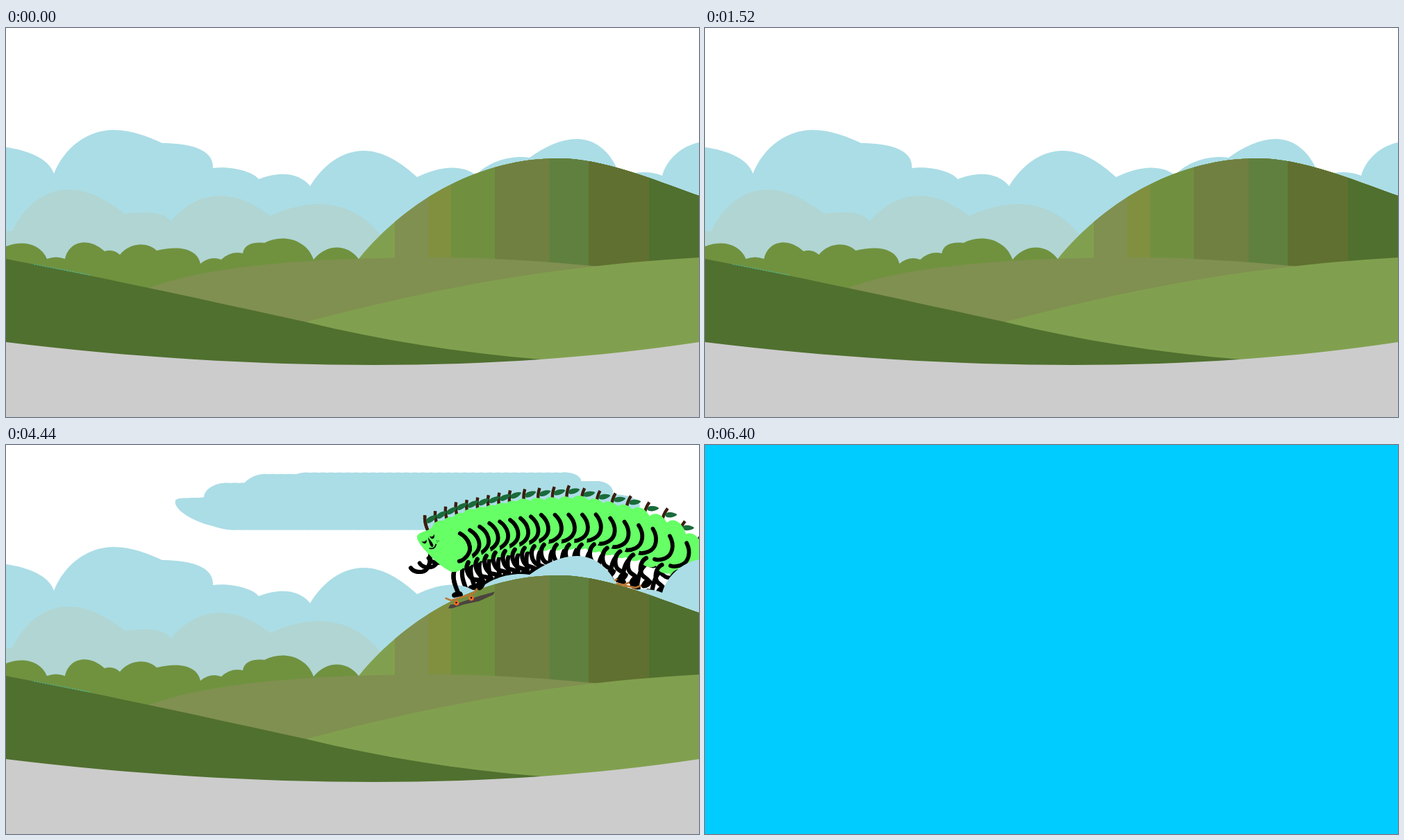
An HTML page with a canvas for the animation above (6.44 s loop, 998 by 561 pixels).

```html
<!DOCTYPE html>
<html lang="en">
<head>
<meta charset="utf-8">
<title>Skating pear</title>
<style>
html, body { margin: 0; width: 100%; height: 100%; overflow: hidden; background: #fff; }
canvas { display: block; width: 998px; height: 561px; }
</style>
</head>
<body>
<canvas id="stage" width="998" height="561"></canvas>
<script>
const ctx = document.getElementById('stage').getContext('2d');
const LOOP = 6440, STEP = 40;
const shape = (d, fill) => ({ path: new Path2D(d), fill });
const line = (d, stroke, width, cap = 'round') => ({ path: new Path2D(d), stroke, width, cap });

function paint(parts) {
  for (const p of parts) {
    if (p.fill) {
      ctx.fillStyle = p.fill;
      ctx.fill(p.path);
    } else {
      ctx.strokeStyle = p.stroke;
      ctx.lineWidth = p.width;
      ctx.lineCap = p.cap;
      ctx.lineJoin = 'round';
      ctx.stroke(p.path);
    }
  }
}

const SKY = '#abdde6';
const farScenery = [
  shape('M0 172 C30 176 62 188 69 210 C84 172 118 147 155 147 C182 147 205 157 225 166 C262 166 300 174 298 202 C325 199 355 207 364 218 C396 206 422 209 438 228 C456 198 484 177 515 177 C544 177 570 195 592 215 C625 199 655 196 677 212 C696 192 728 183 754 187 C776 171 800 160 822 160 C850 160 870 180 880 203 L905 209 Q928 206 945 213 C952 188 974 170 998 165 V561 H0Z', SKY),
  shape('M0 293 H9 C26 258 54 233 90 233 C122 233 150 252 172 268 C198 264 228 264 237 279 C256 257 280 242 308 242 C338 242 360 256 381 271 C404 260 428 254 452 254 C492 254 522 275 540 300 V400 H0Z', '#b0d5d3'),
  shape('M0 315 C26 305 50 312 59 333 Q72 328 85 333 C90 308 118 300 142 322 Q154 318 164 327 C178 309 204 308 217 321 C248 313 276 318 280 340 Q294 328 310 334 Q324 321 341 325 C343 312 356 308 372 310 C396 297 432 303 443 334 C460 312 490 310 507 332 L540 400 H0Z', '#70923f')
];

const hill = new Path2D('M508 333 C580 245 685 188 795 188 C860 188 930 218 998 242 V400 H508Z');
const stripes = [
  [508, '#81a04f'], [560, '#809050'], [608, '#81903f'], [641, '#709040'],
  [704, '#708040'], [783, '#608040'], [839, '#607030'], [926, '#50702f']
];

const nearScenery = [
  shape('M203 376 C300 338 480 331 620 331 C700 331 780 337 855 344 V470 H203Z', '#809050'),
  shape('M432 424 C570 388 750 345 998 331 V500 H432Z', '#81a04f'),
  shape('M0 333 C150 362 300 395 432 424 C540 450 650 468 772 478 V500 H0Z', '#50702f'),
  shape('M0 453 C180 475 360 486 530 486 C700 486 850 475 998 453 V561 H0Z', '#ccc')
];

const cloud = [shape('M616 80 C618 74 650 78 657 75 C658 58 690 48 708 59 C715 60 712 55 722 49 C740 36 766 42 770 54 C775 57 780 55 783 50 C786 36 822 36 828 50 C828 56 830 54 838 53 C860 49 874 58 874 68 C872 73 878 71 885 72 C925 76 920 104 880 100 C882 112 850 118 823 108 C810 122 765 124 745 107 C740 104 738 110 730 114 C710 126 690 124 670 117 C640 110 612 92 616 80Z', SKY)];

const pear = [
  shape('M192 557 L240 555 L330 556 L342 553 L352 562 L340 566 L300 566 L250 571 L200 565Z', '#4b433f'),
  line('M244 531 L259 541 H335 L349 529', '#bc7733', 6),
  shape('M279 554 A8 8 0 1 1 263 554 A8 8 0 1 1 279 554Z M329 554 A8 8 0 1 1 313 554 A8 8 0 1 1 329 554Z', '#ff6b2b'),
  shape('M268 550h5v5h-5z M319 550h5v5h-5z', '#000'),
  line('M298 456 C310 475 308 500 306 525', '#000', 14),
  shape('M293 532 C292 520 310 517 322 520 C332 524 330 536 318 536 L298 538 Q292 537 293 532Z', '#000'),
  line('M355 381 C363 410 378 425 395 423 C415 420 424 410 427 400', '#000', 13),
  shape('M318 294 C308 280 288 280 270 294 C247 312 236 345 232 385 C228 410 221 432 232 442 C243 447 258 440 266 451 C276 460 298 458 306 452 C330 430 350 395 364 362 C372 345 378 325 377 315 C375 302 364 303 352 301 C338 301 326 303 318 294Z', '#6f6'),
  line('M331 252 Q340 275 337 300', '#3c1d0e', 10, 'butt'),
  shape('M296 264 C300 258 328 260 332 270 C336 280 325 282 312 277 C303 273 298 268 296 264Z', '#196b3a'),
  line('M244 440 C262 455 258 485 246 497 C238 503 228 505 222 511', '#000', 14),
  shape('M210 512 C212 504 228 506 236 512 C244 524 246 536 236 538 C222 538 210 522 210 512Z', '#000'),
  line('M241 343 C218 368 217 402 240 418 C252 426 262 429 271 428', '#000', 13),
  // face
  shape('M321 319 Q322 332 330 332 Q337 331 337 320 Q330 330 321 319Z M350 328 Q351 339 358 339 Q365 339 367 329 Q358 336 350 328Z M343 323 C341 332 333 345 335 354 Q340 361 344 352 C345 340 345 332 343 323Z', '#000'),
  line('M326 353 Q335 367 349 359', '#000', 4),
  line('M314 345 h.1 M319 342 h.1 M319.5 347 h.1', '#000', 2.5)
];

function drawPear(px, py, x, y, angle, sx, sy) {
  ctx.save();
  ctx.translate(x, y);
  ctx.rotate(angle);
  ctx.scale(sx, sy);
  ctx.translate(-px, -py);
  paint(pear);
  ctx.restore();
}

// First ride: speeding up along the dip of the road, pivoting on the wheels.
function roadRide(t) {
  const k = (t - 360) / STEP;
  const dx = -432 + 30.2 * k + 0.484 * k * k;
  const dip = x => 30 * (1 - ((x - 530) / 530) ** 2);
  const slope = 60 * (230 - dx) / 530 ** 2 - 0.049;
  drawPear(296, 553, 296 + dx, 553 + dip(300 + dx) - dip(300), slope, 1, 1);
}

// Second ride, by stem tip: time, x, y, degrees.
const hillKeys = [
  [3560, 1052, 175, 22], [3640, 1000, 128, 20], [3720, 950, 91, 16], [3800, 897, 73, 11],
  [3960, 808, 58, 2], [4120, 723, 65, -7], [4320, 645, 82, -13], [4440, 600, 101, -18],
  [4520, 570, 114, -22], [4600, 513, 147, -30], [4720, 440, 213, -39], [4880, 420, 214, -18],
  [5160, 375, 222, -3], [5240, 341, 229, 0], [5440, 255, 251, -8], [5680, 151, 269, 0],
  [5840, 82, 262, 5], [6240, -84, 240, 8]
];
const HILL_START = hillKeys[0][0], HILL_END = 6240;

function hillRide(t) {
  const i = hillKeys.findIndex(k => k[0] >= t);
  const b = hillKeys[i], a = hillKeys[Math.max(0, i - 1)];
  const f = b === a ? 0 : (t - a[0]) / (b[0] - a[0]);
  const [, x, y, deg] = a.map((v, n) => v + (b[n] - v) * f);
  drawPear(331, 251, x + 3, y, deg * Math.PI / 180, -0.445, 0.445);
}

function drawCloud(t) {
  ctx.save();
  ctx.translate(-12 * Math.max(0, (t - 3200) / STEP), 0);
  paint(cloud);
  ctx.restore();
}

function drawScenery() {
  paint(farScenery);
  ctx.save();
  ctx.clip(hill);
  for (const [x, color] of stripes) {
    ctx.fillStyle = color;
    ctx.fillRect(x, 180, 998 - x, 220);
  }
  ctx.restore();
  paint(nearScenery);
  ctx.setLineDash([2, 2]);
  paint([line('M40 340.8 L122 356.5', '#35c4c0', 1, 'butt')]);
  ctx.setLineDash([]);
}

function draw(t) {
  if (t >= 6400) {
    ctx.fillStyle = '#0cf';
    ctx.fillRect(0, 0, 998, 561);
    return;
  }
  ctx.fillStyle = '#fff';
  ctx.fillRect(0, 0, 998, 561);
  // The open sky is never wiped, so earlier poses stay visible behind the scenery.
  for (let s = 3160; s <= t; s += STEP) drawCloud(s);
  for (let s = HILL_START; s <= Math.min(t, 5200); s += STEP) hillRide(s);
  drawScenery();
  if (t >= 360 && t < 1520) roadRide(t);
  if (t >= HILL_START && t <= HILL_END) hillRide(t);
}

let shown = -1;
function tick() {
  const t = Math.floor(performance.now() % LOOP / STEP) * STEP;
  if (t !== shown) draw(shown = t);
  requestAnimationFrame(tick);
}
tick();
</script>
</body>
</html>
```
